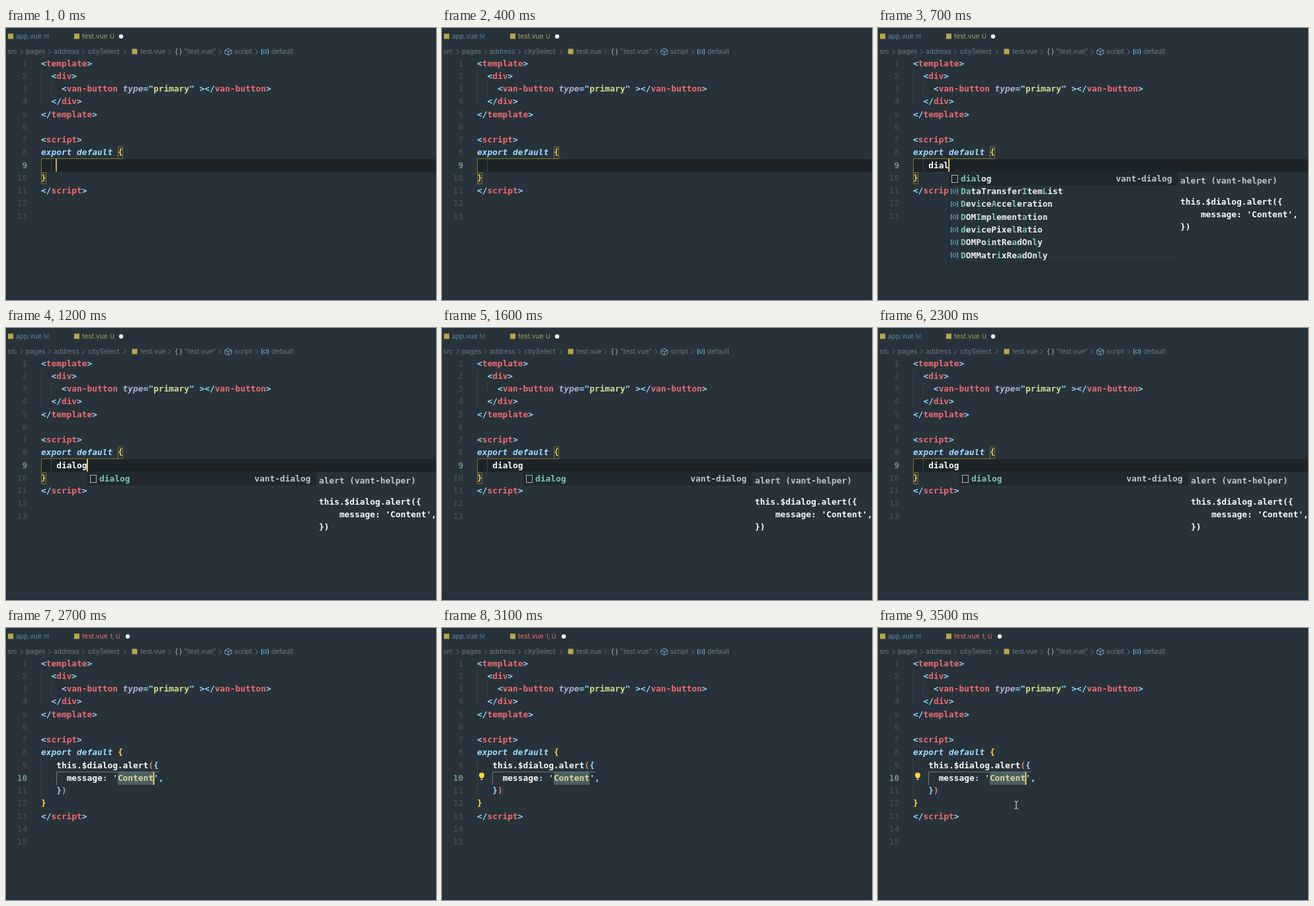
These frames come from a looping animation (650x411 px, 3600 ms). An HTML page:

```html
<!DOCTYPE html>
<html lang="en">
<head>
<meta charset="utf-8">
<title>Snippet completion</title>
<style>
html, body { margin: 0; width: 100%; height: 100%; overflow: hidden; background: #28323a; }
svg { display: block; width: 650px; height: 411px; }
text { white-space: pre; font: bold 12.84px "DejaVu Sans Mono", monospace; }
.ui { font: 10.2px Inter, sans-serif; }
.small { font-size: 9px; }
.tag { fill: #ee6b70; }
.punct { fill: #8fdcff; }
.key { fill: #9cdcfe; font-style: italic; }
.attr { fill: #b1aed0; font-style: italic; }
.str { fill: #d0e08c; }
.white { fill: #f8fdff; }
.brace { fill: #e6d04a; }
.gold { fill: #ffd83a; }
.paren { fill: #d98873; }
.num { fill: #3d4b53; font-weight: bold; }
.active { fill: #6f929a; }
.item { fill: #eaf2f5; }
.hit { fill: #7cc4c0; }
.note { fill: #bcc6cc; }
.line { fill: none; stroke-width: 1; }
</style>
</head>
<body>
<svg id="stage" viewBox="0 0 650 411" xmlns="http://www.w3.org/2000/svg"></svg>
<script>
const LOOP = 3600, CHAR = 7.73, ROW = 19.25, LEFT = 53;
const INSERT = 2400;
const stage = document.getElementById('stage');

const esc = s => s.replace(/&/g, '&amp;').replace(/</g, '&lt;');
const rect = (x, y, w, h, fill, extra = '') =>
  `<rect x="${x}" y="${y}" width="${w}" height="${h}" fill="${fill}" ${extra}/>`;
const path = (d, stroke, extra = '') =>
  `<path class="line" d="${d}" stroke="${stroke}" ${extra}/>`;
const ui = (x, y, s, fill, cls = '') =>
  `<text class="ui ${cls}" x="${x}" y="${y}" fill="${fill}">${esc(s)}</text>`;
const base = n => 57.6 + ROW * (n - 1);

// parts alternate: class, text, class, text...
function run(x, y, ...parts) {
  let s = '';
  for (let i = 0; i < parts.length; i += 2)
    s += `<tspan class="${parts[i]}">${esc(parts[i + 1])}</tspan>`;
  return `<text x="${x}" y="${y}">${s}</text>`;
}
const code = (n, col, ...parts) => run(LEFT + col * CHAR, base(n), ...parts);
const tag = (n, col, open, name) => code(n, col, 'punct', open, 'tag', name, 'punct', '>');

// spans lists start-end times during which the group shows
const during = (spans, body) => `<g data-on="${spans}">${body}</g>`;

function numbers(from, to, active) {
  let s = '';
  for (let n = from; n <= to; n++)
    s += `<text class="num ${n === active ? 'active' : ''}" x="32.3" y="${base(n)}" text-anchor="end">${n}</text>`;
  return s;
}

function variableIcon(x, y) {
  return path(`M${x - 3} ${y - 3.5}h-2v7h2M${x + 3} ${y - 3.5}h2v7h-2M${x - 2.5} ${y - 1}l2.5 -1.5l2.5 1.5v2l-2.5 1.5l-2.5 -1.5z`, '#72b5d6');
}
const fileIcon = (x, y) => rect(x - 4, y - 4, 8, 8, '#b5a845');
const chevron = x => path(`M${x - 2} 32.2l3.5 3.5l-3.5 3.5`, '#667a85');

function header() {
  const crumbs = [[2, 'src'], [30, 'pages'], [72, 'address'], [124, 'citySelect'], [203, 'test.vue'],
    [269.5, '"test.vue"'], [345, 'script'], [401, 'default']];
  const tab = (fill, mark, dot) => ui(115, 16, 'test.vue', fill) +
    ui(157, 16, mark, fill, 'small') + `<circle cx="${dot}" cy="12.8" r="3.2" fill="#eef6f8"/>`;
  return fileIcon(7, 12.5) + ui(15, 16, 'app.vue', '#5c87a3') + ui(57, 16, 'M', '#4c7793', 'small') +
    fileIcon(107, 12.5) +
    during('0-2600', tab('#a7a45c', 'U', 174)) +
    during('2600-3600', tab('#f0686d', '1, U', 184)) +
    crumbs.map(([x, s]) => ui(x, 39.2, s, '#667a85')).join('') +
    ui(255.5, 39, '{', '#b3c2c9') + ui(262, 39, '}', '#b3c2c9') +
    [24, 66, 117, 180, 247, 324, 379].map(chevron).join('') +
    fileIcon(194.5, 35.5) +
    path('M331 33.5l5 -2.5l5 2.5v5l-5 2.5l-5 -2.5zM331 33.5l5 2.5l5 -2.5M336 36v5', '#7fa9bd') +
    variableIcon(391.5, 35.7);
}

function sharedCode() {
  return path('M53.5 63v57M68.5 82v19', '#35434b') +
    numbers(1, 8) +
    tag(1, 0, '<', 'template') + tag(2, 2, '<', 'div') +
    code(3, 4, 'punct', '<', 'tag', 'van-button', 'attr', ' type', 'punct', '="', 'str', 'primary',
      'punct', '" ></', 'tag', 'van-button', 'punct', '>') +
    tag(4, 2, '</', 'div') + tag(5, 0, '</', 'template') + tag(7, 0, '<', 'script') +
    code(8, 0, 'key', 'export default');
}

function before() {
  return rect(53, 198, 597, 19.5, '#1c2429') +
    path('M68.5 198v19', '#35434b') +
    path('M177 197.5H53.5V218', '#7d742c') +
    path('M169.5 179.5h7v18h-7zM53.5 218.5h7v17h-7z', '#7d742c') +
    numbers(9, 13, 9) +
    code(8, 15, 'brace', '{') + code(10, 0, 'brace', '}') + tag(11, 0, '</', 'script') +
    during('600-700', code(9, 3, 'white', 'di')) +
    during('700-800', code(9, 3, 'white', 'dial')) +
    during('800-2400', code(9, 3, 'white', 'dialog'));
}

function after() {
  return path('M53.5 198v57M91.5 237v19', '#35434b') +
    rect(169, 218, 54, 19, '#4d5d62') +
    path('M231 217.5H76.5V237', '#66797f') +
    numbers(9, 15, 10) +
    code(8, 15, 'gold', '{') +
    code(9, 3, 'white', 'this.$dialog.alert', 'paren', '(', 'punct', '{') +
    code(10, 5, 'white', 'message', 'punct', ": '", 'str', 'Content', 'punct', "',") +
    code(11, 3, 'punct', '}', 'paren', ')') +
    code(12, 0, 'gold', '}') + tag(13, 0, '</', 'script');
}

// marked letters are preceded by a tilde
function marked(x, y, s) {
  const parts = [];
  s.split(/(~.)/).filter(Boolean).forEach(p =>
    p[0] === '~' ? parts.push('hit', p[1]) : parts.push('item', p));
  return run(x, y, ...parts);
}

function popup(x, items) {
  const bottom = 218 + items.length * 19.6, docs = x + 350;
  const rows = items.map((s, i) => {
    const y = 227.7 + i * 19.28;
    const icon = i ? variableIcon(x + 8.5, y)
      : rect(x + 4.5, 222.5, 9, 11, 'none', 'stroke="#eef4f6" stroke-dasharray="2 1"');
    return icon + marked(x + 18, y + 4.2, s);
  }).join('');
  return rect(x, 218, 650 - x, 95, '#28323a') +
    rect(x, 218, 346, bottom - 218, '#28323a') +
    path(`M${x + .5} 218V${bottom}H${x + 346}`, '#20292f') +
    rect(x + 1, 218, 345, 20, '#20292f') + rows +
    run(x + 252.5, 231.9, 'note', 'vant-dialog') +
    run(docs, 234.7, 'note', 'alert (vant-helper)') +
    run(docs, 266.7, 'white', 'this.$dialog.alert({') +
    run(docs, 285.9, 'white', "    message: 'Content',") +
    run(docs, 305, 'white', '})');
}

const caret = (spans, x, y, fill = '#f6de68') => during(spans, rect(x, y, 1.8, 19, fill));

const bulb = '<circle cx="60" cy="222.5" r="4" fill="#ffd52e"/>' +
  rect(58, 225, 4, 2, '#ffd52e') + rect(58.5, 228, 3, 1.5, '#d8dde0');

const beam = 'M206 261.5q3 0 3 2.5v7q0 2.5 -3 2.5M212 261.5q-3 0 -3 2.5M212 273.5q-3 0 -3 -2.5';

stage.innerHTML = rect(0, 0, 650, 411, '#28323a') +
  rect(648, 46, 1, 361, '#242d34') + rect(0, 407, 650, 4, '#252e3e') +
  header() + sharedCode() +
  during(`0-${INSERT}`, before()) +
  during(`${INSERT}-${LOOP}`, after()) +
  during('700-800', popup(107, ['~d~i~a~log', '~D~ataTransfer~Item~List', '~Dev~ice~Acce~leration',
    '~DOM~Imp~lement~ation', '~dev~icePixe~lR~atio', '~DOMPo~intRe~adOn~ly', '~DOMMatr~ixRe~adOn~ly'])) +
  during('800-2400', popup(123, ['~d~i~a~l~o~g'])) +
  caret('0-300', 75, 198, '#d8b768') + caret('600-700', 91, 198) + caret('700-800', 106.3, 198) +
  caret('800-1300 1800-2300', 122, 198) + caret('2400-2900 3400-3600', 222.5, 218) +
  during('2900-3600', bulb) +
  during('3200-3600', path(beam, '#1b2226', 'style="stroke-width:2.6"') + path(beam, '#e8eef0'));

const timed = [...stage.querySelectorAll('[data-on]')].map(el => ({
  el, spans: el.dataset.on.split(' ').map(s => s.split('-').map(Number))
}));

function draw(now) {
  const t = now % LOOP;
  for (const { el, spans } of timed)
    el.style.display = spans.some(([a, b]) => t >= a && t < b) ? '' : 'none';
}
const start = performance.now();
function tick() {
  draw(performance.now() - start);
  requestAnimationFrame(tick);
}
draw(0);
requestAnimationFrame(tick);
</script>
</body>
</html>
```
